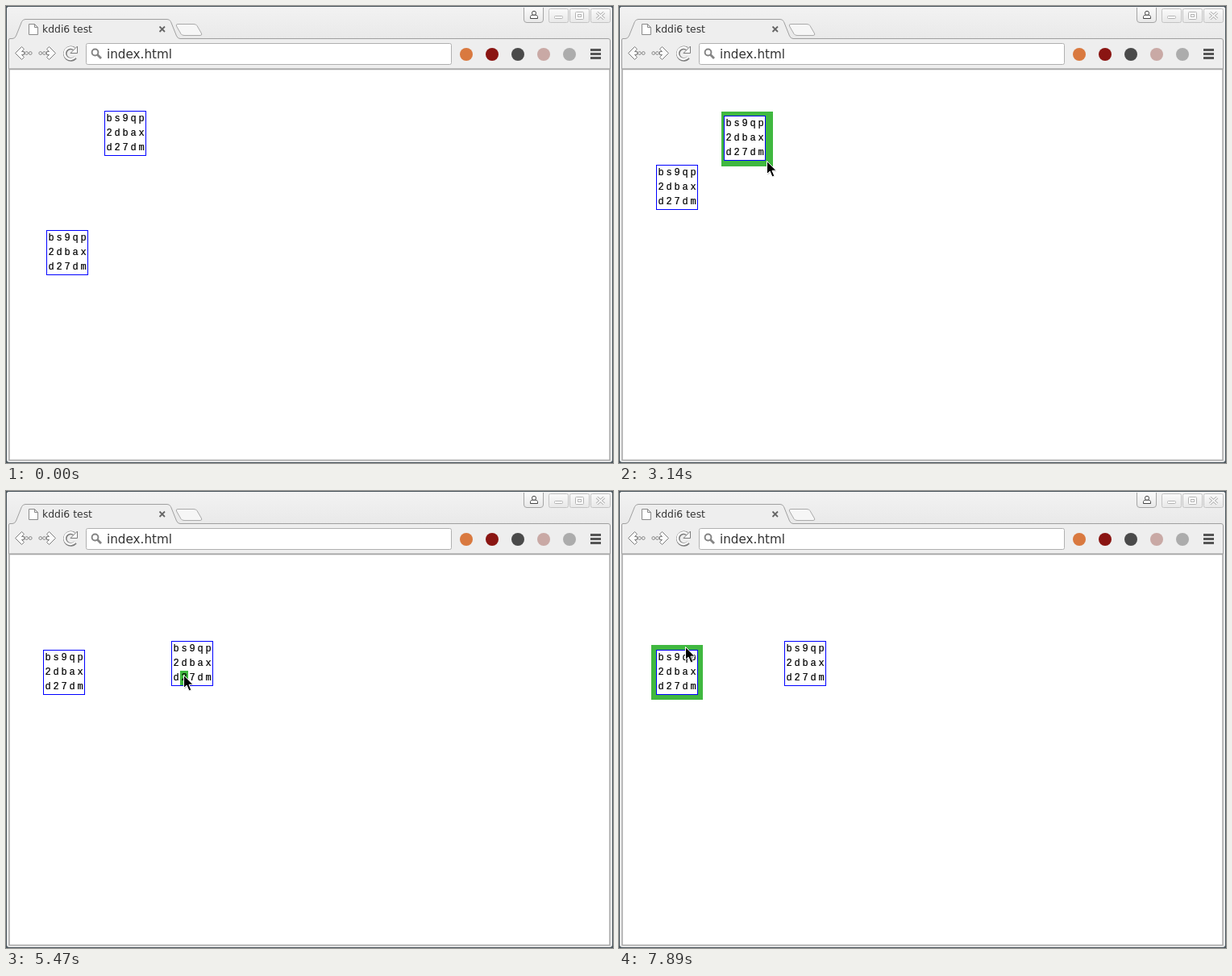
These frames come from a looping animation (753 px wide and 567 px high, 8000 ms). An HTML page:

```html
<!DOCTYPE html>
<html lang="en">
<head>
<meta charset="utf-8">
<title>kddi6 test</title>
<style>
  html, body { margin: 0; width: 100%; height: 100%; overflow: hidden; background: #fff; }
  svg { display: block; width: 753px; height: 567px; }
  .ui { font-family: "DejaVu Sans", sans-serif; fill: #333; }
  .cell { font: 12px "Liberation Mono", monospace; text-anchor: middle; fill: #000; stroke: #000; stroke-width: .2; }
  .line { fill: none; }
</style>
</head>
<body>
<svg viewBox="0 0 753 567" xmlns="http://www.w3.org/2000/svg">
  <defs>
    <linearGradient id="bar" x2="0" y2="1">
      <stop offset="0" stop-color="#f2f2f2"/><stop offset="1" stop-color="#e9e9e9"/>
    </linearGradient>
    <linearGradient id="button" x2="0" y2="1">
      <stop offset="0" stop-color="#fafafa"/><stop offset="1" stop-color="#e8e8e8"/>
    </linearGradient>
    <g id="arrow" stroke="#7c7c7c" fill="#fbfbfb">
      <path d="M.5 9.5l8-8l3 3l-3 3h3v4h-3l3 3l-3 3z" stroke-linejoin="round"/>
      <circle cx="14.500" cy="9.500" r="1.800"/><circle cx="19.300" cy="9.500" r="1.800"/>
    </g>
  </defs>

  <!-- Window frame -->
  <rect width="753" height="567" fill="#48545b"/>
  <rect x="1" y="1" width="751" height="565" rx="3" fill="#ededed"/>
  <rect x="1" y="1" width="751" height="40" rx="3" fill="url(#bar)"/>

  <!-- Tabs -->
  <path d="M3.500 78V42q0-1.500 1.500-1.500h3q3 0 4.500-3.500l7-17.500q1.500-3 4.500-3h176q3 0 4.500 3l7 17.500q1.500 3.500 4.500 3.500h531q2.500 0 2.500 2.500v35z" fill="#eee" stroke="#a0a0a0"/>
  <path d="M213 22.500h20q3 0 4 2l5.500 9.500q1 2.500-1.500 2.500h-20q-3 0-4-2l-5.500-9.500q-1-2.500 1.500-2.500z" fill="#f6f6f6" stroke="#aaa"/>
  <path d="M28.500 22.500h7l4 4v9h-11zm7 0v4h4" fill="#fff" stroke="#8a8a8a"/>
  <text class="ui" x="45" y="33" font-size="12.4">kddi6 test</text>
  <path d="M190.500 25.500l6.500 6.500m0-6.500l-6.500 6.500" stroke="#666" stroke-width="1.800"/>

  <!-- Window buttons -->
  <path d="M642.500 2v15q0 3.500 3.500 3.500h17q3.500 0 3.500-3.500v-15" fill="url(#button)" stroke="#a5a5a5"/>
  <g fill="#fff" stroke="#444">
    <path d="M650.500 15.500v-2q0-2.500 4.500-2.500t4.500 2.500v2z"/><circle cx="655" cy="8.800" r="2.500"/>
  </g>
  <g id="buttons" fill="url(#button)" stroke="#c4c4c4"></g>
  <g fill="#fff" stroke="#b4b4b4">
    <rect x="680.500" y="12.500" width="10" height="3" rx="1"/>
    <rect x="706.500" y="7.500" width="10" height="9" rx="1"/>
    <rect x="709.500" y="10.500" width="4" height="3"/>
    <path id="close" d="M733 8l9 8m0-8l-9 8" stroke-width="3.600"/>
    <path d="M733 8l9 8m0-8l-9 8" stroke="#fff" stroke-width="1.600"/>
  </g>

  <!-- Toolbar -->
  <use href="#arrow" x="11" y="49"/>
  <use href="#arrow" transform="translate(62 49) scale(-1 1)"/>
  <path class="line" d="M86 64a7.300 7.300 0 1 1-1.500-11" stroke="#7c7c7c" stroke-width="4.600"/>
  <path d="M88.500 50v8.500h-8.500z" fill="#fbfbfb" stroke="#7c7c7c"/>
  <path class="line" d="M85.500 63.500a7.300 7.300 0 1 1-1-10.500" stroke="#fbfbfb" stroke-width="2.600"/>
  <rect x="99.500" y="46.500" width="453" height="26" rx="2" fill="#fff" stroke="#b0b0b0"/>
  <circle class="line" cx="110.500" cy="57.500" r="3.900" stroke="#858585" stroke-width="2"/>
  <path d="M113.500 60.500l4.500 4.500" stroke="#858585" stroke-width="2.800"/>
  <text class="ui" x="125" y="65" font-size="15.2">index.html</text>
  <g id="extensions"></g>
  <path d="M725 54.500h13m-13 5h13m-13 5h13" stroke="#555" stroke-width="2.800"/>

  <!-- Page -->
  <rect x="4" y="78.500" width="745" height="485" fill="#fff" stroke="#a8a8a8" stroke-width="1.500"/>
  <g id="blocks"></g>
  <g id="cursor">
    <path d="M1 2v15.500l3.500-3.500l2.500 6l2.800-1.200l-2.600-5.800h4.800z" opacity=".18"/>
    <path d="M0 0v16l3.700-3.400l2.800 6.900l2.800-1.200l-2.800-6.600h5z" stroke="#fff"/>
  </g>
</svg>

<script>
const LOOP = 8000, LAG = 25;
const GREEN = "#40b840";
const ROWS = ["bs9qp", "2dbax", "d27dm"];
const CELL_W = 10, CELL_H = 18, BOX_W = 52, BOX_H = 56, RIM = 6;

const linear = u => u;
const easeIn = u => u * u;
const easeOut = u => 1 - (1 - u) ** 2;

// Pointer gestures; between them it rests. Sway adds one vertical wave on the way.
const START = { x: 6, y: 202 };
const dragLeft = { from: 1710, to: 1970, x: 80, y: 194, ease: easeOut };
const dragRight = { from: 2950, to: 3470, x: 256, y: 242, ease: easeIn };
const MOVES = [
  { from: 850, to: 1430, x: 84, y: 275 },
  dragLeft,
  { from: 2040, to: 2480, x: 163, y: 198 },
  { from: 2520, to: 2730, x: 173, y: 186 },
  dragRight,
  { from: 3500, to: 3710, x: 247, y: 233 },
  { from: 3780, to: 4560, x: 245, y: 206, sway: 18 },
  { from: 4600, to: 5160, x: 221, y: 229 },
  { from: 5470, to: 5870, x: 220, y: 196 },
  { from: 6110, to: 6230, x: 203, y: 198 },
  { from: 6230, to: 6910, x: 82, y: 215 },
  { from: 6910, to: 6990, x: 74, y: 210 },
  { from: 7250, to: 7890, x: 83, y: 194, sway: 6 }
];

// Each block follows the pointer at a fixed offset during its drag
const BLOCKS = [
  { dx: -34, dy: 3, drag: dragLeft },
  { dx: -51, dy: -56, drag: dragRight }
];

const clamp = (v, lo, hi) => Math.min(hi, Math.max(lo, v));

function pointer(t) {
  let { x, y } = START;
  for (const m of MOVES) {
    if (t < m.from) break;
    const u = clamp((t - m.from) / (m.to - m.from), 0, 1);
    const k = (m.ease ?? linear)(u);
    x += (m.x - x) * k;
    y += (m.y - y) * k + (m.sway ?? 0) * Math.sin(2 * Math.PI * u);
  }
  return [Math.round(x), Math.round(y)];
}

function place({ dx, dy, drag }, t) {
  const [x, y] = pointer(clamp(t, drag.from, drag.to));
  return [x + dx, y + dy];
}

function add(parent, tag, attrs = {}) {
  const el = document.createElementNS("http://www.w3.org/2000/svg", tag);
  for (const name in attrs) el.setAttribute(name, attrs[name]);
  parent.append(el);
  return el;
}

const byId = id => document.getElementById(id);
const move = (el, x, y) => el.setAttribute("transform", `translate(${x} ${y})`);
const show = (el, on) => el.setAttribute("visibility", on ? "visible" : "hidden");

function buildChrome() {
  for (let i = 0; i < 3; i++)
    add(byId("buttons"), "rect", { x: 673.5 + 26 * i, y: 3.5, width: 24, height: 17, rx: 2 });
  ["#d9793f", "#8a1512", "#4a4a4a", "#c9a9a5", "#acacac"].forEach((fill, i) =>
    add(byId("extensions"), "circle", { cx: 571 + 32 * i, cy: 60, r: 8, fill }));
}

function buildBlock(block) {
  const layer = byId("blocks");
  block.rim = add(layer, "rect", { width: BOX_W + 2 * RIM, height: BOX_H + 2 * RIM, fill: GREEN });
  block.box = add(layer, "g");
  add(block.box, "rect", { x: .5, y: .5, width: BOX_W - 1, height: BOX_H - 1, fill: "#fff", stroke: "#00f" });
  block.mark = add(block.box, "rect", { width: CELL_W, height: CELL_H, fill: GREEN });
  ROWS.forEach((row, r) => [...row].forEach((ch, c) => {
    const text = add(block.box, "text", { class: "cell", x: 6 + c * CELL_W, y: 13 + r * CELL_H });
    text.textContent = ch;
  }));
}

// The box and the hover highlight trail the pointer slightly
function drawBlock(block, t) {
  const [gx, gy] = place(block, t);
  const [bx, by] = place(block, t - LAG);
  const [px, py] = pointer(t - LAG);
  const x = px - bx, y = py - by;
  const col = Math.floor((x - 1) / CELL_W), row = Math.floor((y - 1) / CELL_H);
  const onCell = col >= 0 && col < ROWS[0].length && row >= 0 && row < ROWS.length;
  const near = x >= -RIM && x < BOX_W + RIM && y >= -RIM && y < BOX_H + RIM;

  move(block.rim, gx - RIM, gy - RIM);
  move(block.box, bx, by);
  show(block.rim, near && !onCell);
  show(block.mark, onCell);
  if (onCell) move(block.mark, 1 + col * CELL_W, 1 + row * CELL_H);
}

function draw(t) {
  for (const block of BLOCKS) drawBlock(block, t);
  const [x, y] = pointer(t);
  move(byId("cursor"), x - .5, y - .5);
  show(byId("cursor"), t >= MOVES[0].from);
}

let origin;
function tick(now) {
  origin ??= now;
  draw((now - origin) % LOOP);
  requestAnimationFrame(tick);
}

buildChrome();
BLOCKS.forEach(buildBlock);
draw(0);
requestAnimationFrame(tick);
</script>
</body>
</html>
```
